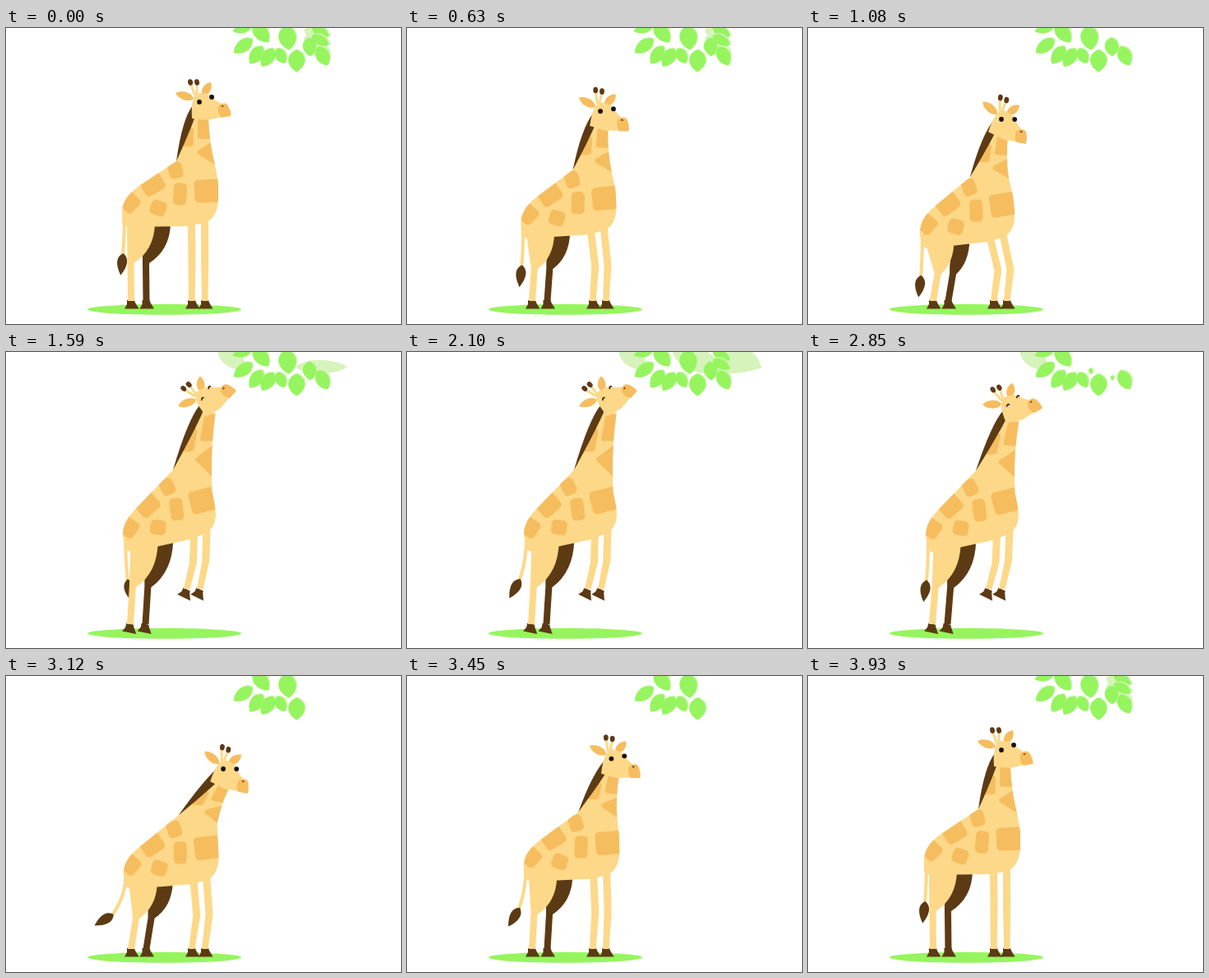
These frames come from a looping animation (480x360 px, 3.96 s). An HTML page with a canvas:

```html
<!DOCTYPE html>
<html lang="en">
<head>
<meta charset="utf-8">
<title>Giraffe reaching for leaves</title>
<style>
html, body { margin: 0; width: 100%; height: 100%; overflow: hidden; background: #fff; }
canvas { display: block; width: 480px; height: 360px; }
</style>
</head>
<body>
<canvas id="stage" width="480" height="360"></canvas>
<script>
const ctx = document.getElementById('stage').getContext('2d');
const LOOP = 3960, STEP = 30, LEG = 94, RAD = Math.PI / 180;
const SKIN = '#fcd888', SPOT = '#f6bd5f', BROWN = '#5c3a14', GREEN = '#96f55e', PALE = '#d5f3bb';

// Body x, y, degrees, then head x, y, degrees; each action adds its offsets to the rest pose.
const REST = [152, 212, 0, 235, 90, 0];
const ACTIONS = {
  crouch: [-6, 26, -5.7, 0, 21, 22],
  lift: [-1, 1, -11.5, 4, -33, -37],
  tug: [1, 1, 0, 4, 8, 18],
  land: [1, 17, -3.8, 29, 23, 22]
};

// Leaf centre, lean from vertical, length, and the times it is gone
const LEAVES = [
  [287, 1, 75, 24, 2940, 3500], [288, 22, 54, 28], [310, 6, -38, 29],
  [304, 33, 36, 26], [318, 36, 33, 26], [334, 34, -28, 21],
  [342, 12, -8, 30, 2760, 3000], [353, 40, 0, 27],
  [369, 23, -5, 23, 2760, 3600], [385, 34, -27, 26, 3000, 3500]
];

const mix = (a, b, k) => a + (b - a) * k;
const mixPoint = (p, q, k) => [mix(p[0], q[0], k), mix(p[1], q[1], k)];
const clamp = v => Math.max(0, Math.min(1, v));
function ramp(t, from, to) {
  const k = clamp((t - from) / (to - from));
  return k * k * (3 - 2 * k);
}

function weightsAt(t) {
  const jump = ramp(t, 1110, 1500), fall = ramp(t, 2870, 3090);
  return {
    crouch: ramp(t, 200, 1020) * (1 - jump),
    lift: jump * (1 - fall),
    tug: ramp(t, 2300, 2820) * (1 - fall),
    land: fall * (1 - ramp(t, 3150, 3720))
  };
}

// Maps points around a resting pivot to a new place and angle.
function frame(px, py, x, y, deg) {
  const c = Math.cos(deg * RAD), s = Math.sin(deg * RAD);
  return (u, v) => [x + (u - px) * c - (v - py) * s, y + (u - px) * s + (v - py) * c];
}

const move = p => ctx.moveTo(...p);
const line = p => ctx.lineTo(...p);
const quad = (c, p) => ctx.quadraticCurveTo(...c, ...p);
function fill(color, build) {
  ctx.fillStyle = color;
  ctx.beginPath();
  build();
  ctx.fill();
}
function stroke(color, width, build) {
  ctx.strokeStyle = color;
  ctx.lineWidth = width;
  ctx.beginPath();
  build();
  ctx.stroke();
}
const poly = (color, pts) => fill(color, () => pts.forEach(line));
const dot = (color, [x, y], rx, ry = rx, rot = 0) =>
  fill(color, () => ctx.ellipse(x, y, rx, ry, rot, 0, 7));

function blob(color, pts, r) {
  fill(color, () => {
    move(mixPoint(pts[pts.length - 1], pts[0], .5));
    pts.forEach((p, i) => ctx.arcTo(...p, ...pts[(i + 1) % pts.length], r));
  });
}

function leaf(color, base, tip, w) {
  const at = frame(0, 0, ...base, Math.atan2(tip[1] - base[1], tip[0] - base[0]) / RAD);
  const len = Math.hypot(tip[0] - base[0], tip[1] - base[1]);
  fill(color, () => {
    move(base);
    ctx.bezierCurveTo(...at(len * .2, w * .7), ...at(len * .75, w * .6), ...tip);
    ctx.bezierCurveTo(...at(len * .75, -w * .6), ...at(len * .2, -w * .7), ...base);
  });
}

function hoof([x, y], tilt) {
  const at = frame(0, 0, x, y, tilt);
  poly(BROWN, [at(-1, -1), at(8, -1), at(9, 2), at(13.5, 9.5), at(-4, 9.5), at(-1, 4)]);
}

// The knee sits halfway and is pushed out as the leg gets shorter.
function kneeOf(hip, ankle, push) {
  const [x, y] = mixPoint(hip, ankle, .5);
  return [x + push * (LEG - Math.hypot(hip[0] - ankle[0], hip[1] - ankle[1])), y];
}

function hindLeg(color, left, right, knee, ankle, tilt, dx) {
  const [kx, ky] = [knee[0] + dx, knee[1]], [ax, ay] = [ankle[0] + dx, ankle[1]];
  hoof([ax, ay], tilt);
  fill(color, () => {
    move(left);
    line([kx, ky - (dx ? 8 : 0)]);
    line([kx, ky]);
    line([ax, ay]);
    line([ax + 8, ay]);
    line([kx + 8, ky + 1]);
    quad([right[0] - 1, mix(right[1], ky, .68)], right);
  });
}

function foreLeg(hip, ankle, lift) {
  const [x, y] = hip, [ax, ay] = ankle;
  const [kx, ky] = kneeOf(hip, ankle, mix(.36, .1, lift));
  hoof(ankle, 26 * lift);
  poly(SKIN, [[x, y - 8], hip, [kx, ky], ankle, [ax + 7.5, ay], [kx + 9, ky], [x + 9, y], [x + 9, y - 8]]);
}

function drawTail(root, swing) {
  const base = frame(0, 0, ...root, swing)(0, 54);
  stroke(SKIN, 4, () => { move(root); quad([root[0], mix(root[1], base[1], .55)], base); });
  const at = frame(0, 0, ...base, swing * 3.3);
  fill(BROWN, () => {
    move(at(0, -2));
    ctx.bezierCurveTo(...at(8, 3), ...at(8, 12), ...at(0, 25));
    ctx.bezierCurveTo(...at(-8, 12), ...at(-8, 3), ...at(0, -2));
  });
}

function drawHead(at, deg, asleep) {
  const turn = deg * RAD;
  for (const x of [224, 232]) {
    stroke(SKIN, 3, () => { move(at(mix(x, 232, .7), 82)); line(at(x, 67)); });
    dot(BROWN, at(x, 66), 2.9, 3.8, turn - .2);
  }
  leaf(SPOT, at(228, 86), at(206, 79), 10);
  leaf(SPOT, at(239, 82), at(249, 66), 10);
  fill(SKIN, () => {
    move(at(226, 110));
    quad(at(224, 80), at(235, 79));
    quad(at(248, 78), at(255, 88));
    line(at(263, 93));
    line(at(263, 108));
    line(at(246, 112));
  });
  fill(SPOT, () => {
    move(at(258, 95));
    quad(at(266, 88), at(270, 95));
    quad(at(275, 105), at(273, 107));
    line(at(262, 109));
    quad(at(256, 103), at(258, 95));
  });
  dot('#8a4a1c', at(263, 95), 1.5, 1.1, turn);
  for (const [x, y] of [[235, 90], [250, 84]]) {
    if (asleep) stroke('#2a1a0c', 1.6, () => { move(at(x - 2, y + 1)); quad(at(x, y - 3), at(x + 2, y)); });
    else dot('#15100c', at(x, y), 2.9);
  }
}

function drawGiraffe(t) {
  const w = weightsAt(t), lift = w.lift;
  const [bx, by, lean, hx, hy, nod] = REST.map((v, i) =>
    Object.keys(w).reduce((sum, name) => sum + w[name] * ACTIONS[name][i], v));
  const B = frame(152, 212, bx, by, lean);
  const H = frame(235, 90, hx, hy, nod);
  const collar = frame(235, 90, hx, hy, nod * .4);

  // The neck spans from the collar to the shoulders; N(u, v) runs across and down it.
  const stretch = 8 * lift + 5 * w.land + w.crouch;
  const shift = ([x, y], rise) => [x + stretch, y + stretch * rise];
  const tl = collar(226, 106), tr = collar(246, 110);
  const bl = shift(B(207, 162), -1.2), br = shift(B(254, 167), .4);
  const N = (u, v) => mixPoint(mixPoint(tl, tr, u), mixPoint(bl, br, u), v);

  const hip = B(147, 238), heel = [148 - lift, 332 - lift];
  const knee = kneeOf(hip, heel, .3);
  const toe = mixPoint([222, 332], [216, 288], lift);
  const sway = 3 - 6 * Math.cos((t - 1590) / 1020 * 2 * Math.PI);

  hindLeg(BROWN, B(179, 238), B(200, 238), knee, heel, 12 * lift, 18.5);
  drawTail(B(144, 222), mix(2, sway, lift) + 16 * w.land);
  foreLeg(B(237, 237), [toe[0] + 16, toe[1]], lift);
  foreLeg(B(221, 238), toe, lift);
  hindLeg(SKIN, hip, B(181, 238), knee, heel, 12 * lift, 0);

  ctx.save();
  fill(SKIN, () => {
    move(tl);
    line(bl);
    line(B(162, 192));
    quad(B(140, 207), B(141, 226));
    line(B(141, 238));
    line(B(148, 242));
    line(B(222, 241));
    line(B(238, 238));
    quad(B(258, 234), B(258, 205));
    line(B(258, 190));
    quad(mixPoint(B(258, 185), br, .5), br);
    quad(N(.9, .5), tr);
    ctx.closePath();
  });
  ctx.clip();
  const neckPatch = (...pts) => blob(SPOT, pts.map(p => N(...p)), 3);
  neckPatch([.38, .03], [1.2, .03], [1.2, .43], [.48, .47]);
  neckPatch([.16, .1], [.37, .64], [.06, .68], [-.05, .58]);
  neckPatch([1.1, .46], [1.1, 1.04], [.45, .77]);
  // Body patches: centre, width, height, degrees
  for (const [x, y, pw, ph, deg] of [
    [206, 173, 17, 20, -15], [178, 190, 27, 23, -30], [150, 212, 22, 22, 45],
    [185, 219, 19, 18, 20], [211.5, 202, 16, 27, 4], [246, 198, 34, 28, -3]
  ]) {
    const at = frame(0, 0, x, y, deg);
    blob(SPOT, [[-1, -1], [1, -1], [1, 1], [-1, 1]].map(([i, j]) => B(...at(i * pw / 2, j * ph / 2))), 5);
  }
  ctx.restore();

  fill(BROWN, () => {
    move(H(227, 94));
    quad(N(-.42, .12), bl);
    quad(N(.14, .35), N(.22, -.05));
  });
  drawHead(H, nod, lift > .6);
}

function drawLeaf([x, y, lean, len, gone = LOOP, back = LOOP], t) {
  const size = Math.max(clamp((gone - t) / 120 + 1), clamp((t - back) / 120));
  if (!size) return;
  const at = frame(0, 0, x, y, lean);
  const width = len * (.76 - Math.abs(lean) * .004) * size;
  const base = at(0, len * (.5 - size)), tip = at(0, len / 2);
  leaf(PALE, [base[0] + 1, base[1] - 1], [tip[0] + 1, tip[1] - 1], width + 1);
  leaf(GREEN, base, tip, width);
}

function drawLeaves(t) {
  const resting = t < 640 || t > 3580;
  const rustling = t > 1350 && t < 2740;
  if (t > 1300 && t < 2980) leaf(PALE, [258, -8], [291, 21], 24);
  if (rustling) {
    const edge = 392 + 23 * ramp(t, 1350, 1590) + 16 * ramp(t, 1620, 2040);
    leaf(PALE, [352, 18], [edge, 18], 17);
    if (t > 1650) {
      leaf(PALE, [378, -8], [edge, 19], 28);
      leaf(PALE, [322, -3], [384, 22], 30);
    }
  }
  if (resting) for (const y of [3, 12, 22]) leaf(PALE, [362, y], [395, y + 6], 18);
  LEAVES.forEach(item => drawLeaf(item, t));
  if (resting || rustling && t > 1900)
    for (const y of [4, 15]) drawLeaf([382, y, -62, 24], t);
}

const start = performance.now();
function draw(now) {
  const elapsed = Math.max(0, now - start) % LOOP;
  const t = elapsed - elapsed % STEP;
  ctx.fillStyle = '#fff';
  ctx.fillRect(0, 0, 480, 360);
  dot(GREEN, [192.5, 342.3], 93.5, 6.5);
  drawLeaves(t);
  drawGiraffe(t);
  requestAnimationFrame(draw);
}
draw(start);
</script>
</body>
</html>
```
